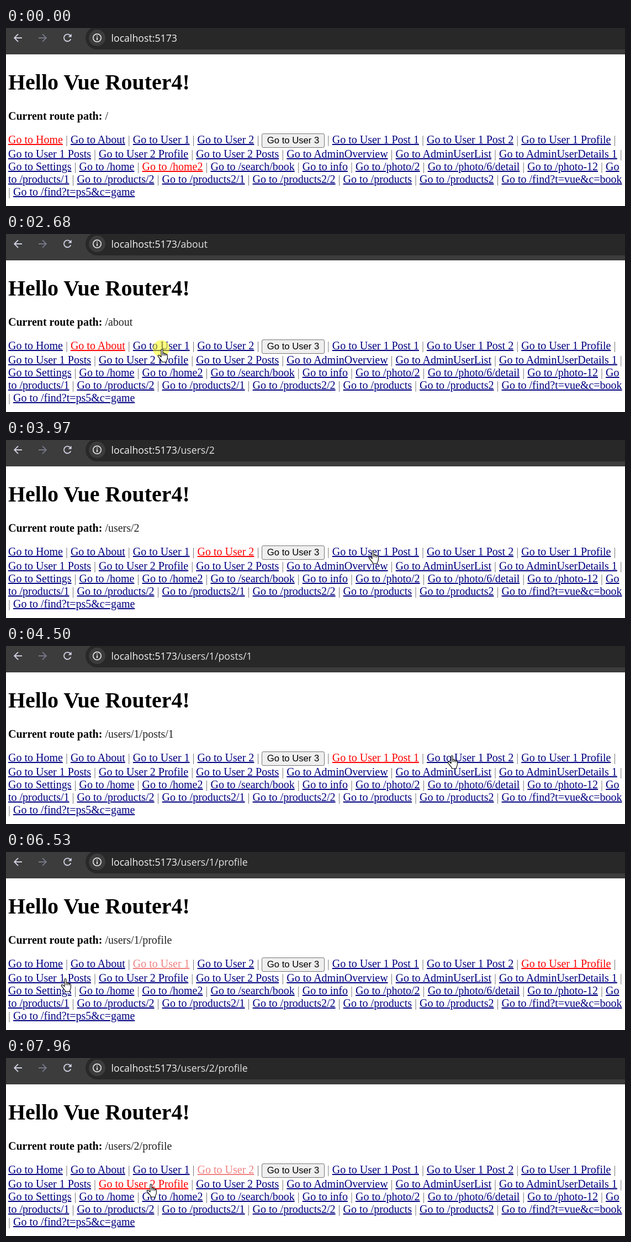
An HTML page that plays this animation: 1121 px wide and 324 px high, repeating every 8 s.

```html
<!DOCTYPE html>
<html lang="en">
<head>
<meta charset="utf-8">
<title>Hello Vue Router4!</title>
<style>
  html, body { margin: 0; width: 100%; height: 100%; overflow: hidden; background: #fff; }
  #stage { position: relative; width: 1121px; height: 324px; overflow: hidden; color: #000;
    font: 20px/23px "Liberation Serif", "Times New Roman", serif; }
  #stage > * { position: absolute; }
  .bar { left: 0; top: 0; }
  .bar text { font: 17.72px "Open Sans", sans-serif; fill: #f4f4f4; }
  .bar tspan { fill: #e3e3e3; }
  h1 { left: 4px; top: 76px; margin: 0; font-size: 40px; line-height: 46px; white-space: pre; }
  .line { left: 4px; white-space: pre; }
  .links { color: #777; }
  #path { color: #222; }
  a { color: #000080; text-decoration: underline; }
  a.active { color: lightcoral; }
  a.exact { color: red; }
  .button { display: inline-block; box-sizing: border-box; width: 113.3px; height: 26px;
    vertical-align: top; text-align: center; color: #000; background: #efefef;
    border: 1px solid #767676; border-radius: 3px;
    font: 16.67px/23px "Liberation Sans", Arial, sans-serif; }
  #pointer { left: 0; top: 0; overflow: visible; pointer-events: none; }
</style>
</head>
<body>
<div id="stage">
  <svg class="bar" width="1121" height="48" fill="none" stroke-width="1.9">
    <rect width="1121" height="48" fill="#3c3c3c"/>
    <rect x="144" y="-3" width="1100" height="42" rx="21" fill="#282828"/>
    <circle cx="165" cy="18" r="15" fill="#3c3c3c"/>
    <path d="M29 18H15.5M22 11.2L15.2 18L22 24.8" stroke="#d0d0e2"/>
    <path d="M59 18H72.5M66 11.2L72.8 18L66 24.8" stroke="#77778a"/>
    <path d="M117.3 20.2A6.4 6.4 0 1 1 116 13.4L118 15.4" stroke="#d0d0e2"/>
    <path d="M118.6 10.5V16.4H112.7Z" fill="#d0d0e2"/>
    <circle cx="165" cy="18" r="7.2" stroke="#e3e3e3" stroke-width="1.7"/>
    <path d="M165 17V22M165 13.7V15.6" stroke="#e3e3e3"/>
    <text x="190.5" y="25">localhost:5173<tspan id="url"></tspan></text>
  </svg>
  <h1>Hello Vue Router4!</h1>
  <div class="line" style="top:149px"><b>Current route path:</b> <span id="path">/</span></div>
  <svg id="pointer" width="1" height="1">
    <circle id="halo" cx="-1" cy="-.5" r="15.2" fill="#ff0" fill-opacity=".5"/>
    <g id="hand" transform="translate(.5 .5) scale(1.12) translate(-7.2 -.5)" stroke="#000" stroke-linejoin="round">
      <path fill="#fff" d="M5.9 13.3V1.9Q6 .5 7.2 .5Q8.5 .5 8.5 1.9V7.6Q8.7 6.6 9.8 6.6Q11 6.6 11 7.8V8.6Q11.2 7.6 12.3 7.6Q13.5 7.7 13.5 8.9V9.8Q13.7 8.8 14.8 8.8Q16 9 16 10.2V15Q16 17 14.5 19.2V21.5H6.9V20Q4 16.5 1 12.5Q.2 11.2 1.2 10.6Q2.3 10 3.4 11Z"/>
      <path fill="none" d="M8.5 7.6V11M11 8.5V11.2M13.5 9.6V11.5"/>
    </g>
    <path id="arrow" fill="#fff" stroke="#000" d="M.5 .5V19.5L4.9 15.4L7.9 22.2L10.8 21L7.9 14.3H14Z"/>
  </svg>
</div>
<script>
const $ = id => document.getElementById(id);
const LOOP = 8000;

// Each row: top edge, then its entries ("*" is the button).
const rows = [
  [192, "Home,About,User 1,User 2,*,User 1 Post 1,User 1 Post 2,User 1 Profile,"],
  [218, "User 1 Posts,User 2 Profile,User 2 Posts,AdminOverview,AdminUserList,AdminUserDetails 1,"],
  [241, "Settings,/home,/home2,/search/book,info,/photo/2,/photo/6/detail,/photo-12,Go"],
  [264, "to /products/1,/products/2,/products2/1,/products2/2,/products,/products2,/find?t=vue&c=book"],
  [287, ",/find?t=ps5&c=game"]
];
const links = {};

function entry(name) {
  if (!name) return "";
  const el = document.createElement(name === "*" ? "span" : "a");
  if (name === "*") {
    el.className = "button";
    el.textContent = "Go to User 3";
  } else {
    el.textContent = /^(Go$|to )/.test(name) ? name : "Go to " + name;
    links[name] = el;
  }
  return el;
}

for (const [top, names] of rows) {
  const line = document.createElement("div");
  line.className = "line links";
  line.style.top = top + "px";
  names.split(",").forEach((name, i) => {
    if (i) line.append(line.textContent ? " | " : "| ");
    line.append(entry(name));
  });
  $("stage").insertBefore(line, $("pointer"));
}

// Start time, path, exactly active links, partly active link.
const routes = [
  [0, "/", ["Home", "/home2"]],
  [1730, "/about", ["About"]],
  [2760, "/users/1", ["User 1"]],
  [3420, "/users/2", ["User 2"]],
  [4230, "/users/1/posts/1", ["User 1 Post 1"]],
  [5110, "/users/1/posts/2", ["User 1 Post 2"]],
  [5850, "/users/1/profile", ["User 1 Profile"], "User 1"],
  [7090, "/users/1/posts", ["User 1 Posts"], "User 1"],
  [7900, "/users/2/profile", ["User 2 Profile"], "User 2"]
];

// Each press lasts until the next route appears.
const presses = [1530, 2620, 3220, 4030, 4970, 5720, 6950, 7760];

// Pointer moves: start, end, target x, target y.
const moves = [
  [530, 1200, 196, 198],
  [2000, 2350, 282, 209],
  [2830, 3200, 379, 203],
  [3490, 4000, 664, 201],
  [4300, 4770, 825, 199],
  [5170, 5450, 1014, 199],
  [5910, 6460, 109, 231],
  [6460, 6530, 107, 230],
  [7150, 7430, 262, 229]
];

function pointerAt(t) {
  let x = 180, y = 316;
  for (const [start, end, tx, ty] of moves) {
    if (t < start) break;
    const p = Math.min(1, (t - start) / (end - start));
    const k = 1 - (1 - p) ** 4;
    x += (tx - x) * k;
    y += (ty - y) * k;
  }
  return [x, y];
}

let current;
function showRoute(route) {
  if (route === current) return;
  current = route;
  const [, path, exact, active] = route;
  $("path").textContent = path;
  $("url").textContent = path === "/" ? "" : path;
  for (const name in links) {
    links[name].className = exact.includes(name) ? "exact" : name === active ? "active" : "";
  }
}

const show = (id, on) => { $(id).style.display = on ? "" : "none"; };

function render(now) {
  const t = now % LOOP;
  showRoute(routes.findLast(r => r[0] <= t));

  const [x, y] = pointerAt(t);
  const overLink = !!document.elementFromPoint(x, y)?.closest("a");
  $("pointer").style.transform = `translate(${Math.round(x)}px, ${Math.round(y)}px)`;
  show("pointer", t >= 530);
  show("hand", overLink);
  show("arrow", !overLink);
  show("halo", presses.some((start, i) => t >= start && t < routes[i + 1][0]));
}

let origin;
function tick(now) {
  origin ??= now;
  render(now - origin);
  requestAnimationFrame(tick);
}
render(0);
requestAnimationFrame(tick);
</script>
</body>
</html>
```
